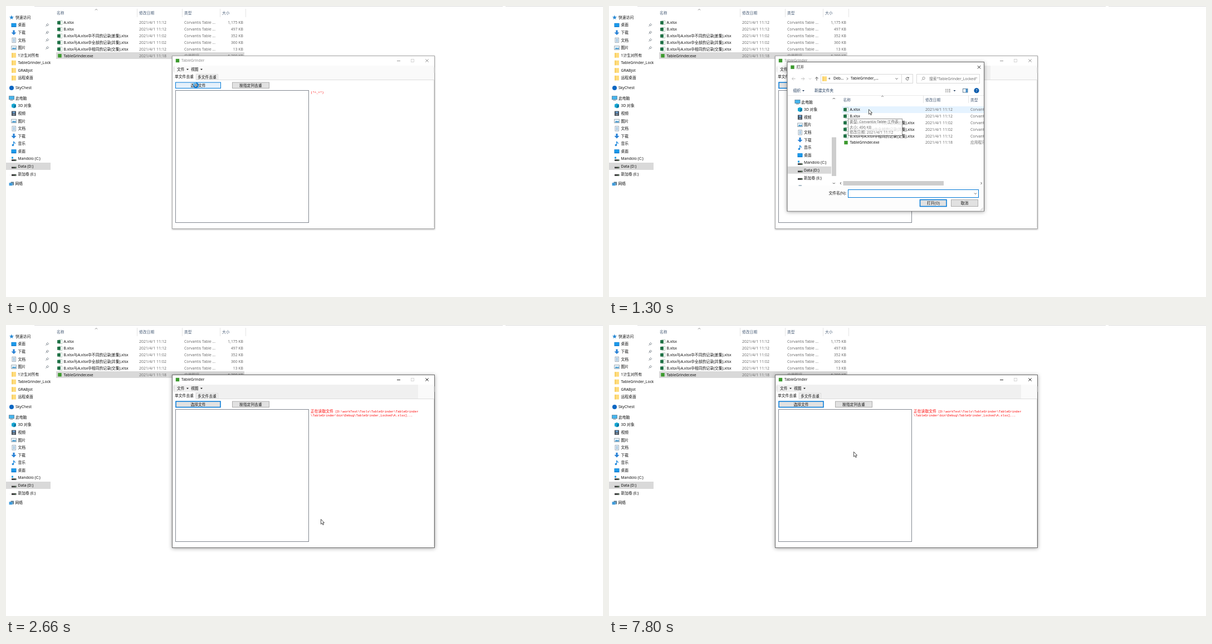
These frames come from a looping animation (1072 by 522 pixels, 8 s). An HTML page:

```html
<!DOCTYPE html>
<html lang="zh-CN">
<head>
<meta charset="utf-8">
<title>TableGrinder</title>
<style>
html, body { margin: 0; width: 100%; height: 100%; overflow: hidden; background: #fff; }
svg { display: block; width: 100vw; height: 100vh; }
text { font-family: "Noto Sans", "Noto Sans CJK SC", sans-serif; white-space: pre; }
.mono { font-family: "Liberation Mono", "Noto Sans CJK SC", monospace; }
.shadow { filter: drop-shadow(0 1px 3.5px rgba(0, 0, 0, .34)); }
.soft { filter: drop-shadow(0 1px 1.5px rgba(0, 0, 0, .3)); }
</style>
</head>
<body>
<script>
const LOOP = 8000;
const APP = 'TableGrinder', FOLDER = APP + '_Locked', SUITE = 'Corvantis Table';
const INK = '#111', GRAY = '#6d6d6d', HEAD = '#4c607a', BLUE = '#0078d7';
const PICKED = '#d9d9d9', FACE = '#f0f0f0', BUTTON = '#e1e1e1';

// Drawing helpers: each returns SVG markup.
const rect = (x, y, w, h, fill, stroke = 'none', sw = 1, extra = '') =>
  `<rect x="${x}" y="${y}" width="${w}" height="${h}" fill="${fill}" stroke="${stroke}" stroke-width="${sw}" ${extra}/>`;
const path = (d, stroke, sw = 1, fill = 'none', extra = '') =>
  `<path d="${d}" stroke="${stroke}" stroke-width="${sw}" fill="${fill}" ${extra}/>`;
const circle = (x, y, r, fill, stroke = 'none', sw = 1) =>
  `<circle cx="${x}" cy="${y}" r="${r}" fill="${fill}" stroke="${stroke}" stroke-width="${sw}"/>`;
const text = (x, y, s, { fill = INK, size = 6.8, anchor = 'start', cls = '' } = {}) =>
  `<text x="${x}" y="${y + 2.4}" fill="${fill}" font-size="${size}" text-anchor="${anchor}" class="${cls}">${s}</text>`;
const at = (x, y, s) => `<g transform="translate(${x} ${y})">${s}</g>`;
const clip = (id, x, y, w, h, s) =>
  `<clipPath id="${id}">${rect(x, y, w, h, '#000')}</clipPath><g clip-path="url(#${id})">${s}</g>`;
const down = (x, y, color = INK) => path(`M${x - 2} ${y - 1}h4l-2 2.3z`, 'none', 0, color);
const chevron = (x, y, angle, color = '#444') =>
  `<g transform="translate(${x} ${y}) rotate(${angle})">${path('M-2 -1L0 1L2 -1', color, .9)}</g>`;
const cross = (x, y, color) => path(`M${x - 2.7} ${y - 2.7}l5.4 5.4m0 -5.4l-5.4 5.4`, color, .9);

// Stepped timelines: keys are [ms, css].
let rules = '', ruleCount = 0;
function keyed(keys, content) {
  const name = 'k' + ruleCount++;
  rules += `@keyframes ${name}{${keys.map(([ms, css]) => `${ms / LOOP * 100}%{${css}}`).join('')}}` +
    `.${name}{animation:${name} ${LOOP}ms step-end infinite}`;
  return `<g class="${name}">${content}</g>`;
}
const during = (from, to, content) =>
  keyed([[0, 'opacity:0'], [from, 'opacity:1'], [to, 'opacity:0']], content);

const drive = rect(-4, .8, 8.5, 2.8, '#3a3a3a') + rect(-3.6, 0, 7.7, .8, '#c4c4c4') + rect(2, 1.8, 1.4, .9, '#6fe07a');
const icons = {
  star: path('M0 -4L1.2 -1.3L4 -1.2L1.8 .7L2.6 3.6L0 2L-2.6 3.6L-1.8 .7L-4 -1.2L-1.2 -1.3z', 'none', 0, '#2a8ad4'),
  desktop: rect(-4.5, -3.2, 9, 7, '#0a7bd0') + rect(-3.8, -2.5, 7.6, 4.6, '#1c9cec'),
  download: path('M-1.6 -4.2h3.2v4h2.9L0 4.4L-4.5 -.2h2.9z', 'none', 0, '#2b83d6'),
  document: rect(-3, -4, 6.5, 8.4, '#fff', '#8496a6', .8) + path('M-1.5 -1.8h3.6m-3.6 2h3.6m-3.6 2h3.6', '#4f8fc4', .9),
  picture: rect(-4.3, -3, 8.8, 6.6, '#e8f3fa', '#8f9ba3', .8) + path('M-3.5 2.6l2.3 -2.8l2 1.4l2 -1.4l1.2 2.8z', 'none', 0, '#2d8bc6'),
  folder: rect(-3.6, -4.2, 7.6, 8.6, '#ffdc7c') + rect(-3.6, -4.2, 1.4, 8.6, '#f4c64f'),
  cloud: circle(0, 0, 4, '#0a66c2'),
  pc: rect(-4.6, -3.8, 9.2, 6, '#45b5ee', '#5b7f96', .8) + rect(-2.6, 3, 5.2, 1.1, '#7a8c98'),
  cube: path('M0 -4.3L4 -2.6V2.5L0 4.3L-4 2.5V-2.6z', 'none', 0, '#19a7d3') + path('M0 -.8L4 -2.6V2.5L0 4.3z', 'none', 0, '#0c7ca5'),
  video: rect(-4, -4, 8, 8.4, '#3d4650') + rect(-2.3, -3, 4.7, 2.8, '#6aa2d6') + rect(-2.3, .7, 4.7, 2.8, '#7b8794'),
  music: path('M-.4 2.6V-4c.6 2 3 2 2.8 4.4', '#1e88dc', 1.2) + circle(-1.6, 2.7, 1.8, '#1e88dc'),
  system: at(0, .4, drive) + rect(-4, -3.4, 3, 3, '#1ea0e6'),
  drive,
  network: rect(-4.4, -1.8, 6, 5, '#3d9bdc') + path('M-1.5 -3.6h5.5v6.2h-2V-1.5h-3.5z', 'none', 0, '#56798f'),
  sheet: rect(-1.5, -3.7, 5.7, 7.4, '#fff', '#9db8a8', .7) + rect(-4.4, -2.9, 5.8, 5.8, '#1e7145'),
  app: rect(-3.2, -3.2, 6.4, 6.4, '#3c9a2e'),
  blank: path('M-3 -4.2h4.2l2 2V4.2h-6.2z', '#8a8a8a', .8, '#fff'),
};
const icon = (name, x, y) => at(x, y, icons[name]);

const drives = [['system', 'Mandolo (C:)'], ['drive', 'Data (D:)'], ['drive', '新加卷 (E:)']];
const places = [['cube', '3D 对象'], ['video', '视频'], ['picture', '图片'], ['document', '文档'],
  ['download', '下载'], ['music', '音乐'], ['desktop', '桌面'], ...drives];
const files = [
  ['A.xlsx', '11:12', '1,175 KB'],
  ['B.xlsx', '11:12', '497 KB'],
  ['B.xlsx与A.xlsx中不同的记录(差集).xlsx', '11:02', '352 KB'],
  ['B.xlsx与A.xlsx中全部的记录(并集).xlsx', '11:02', '360 KB'],
  ['B.xlsx与A.xlsx中相同的记录(交集).xlsx', '11:12', '13 KB'],
  [APP + '.exe', '11:18', '6,200 KB'],
];

function fileRows(iconX, nameX, dateX, typeX, top, sizeX, iconFor = i => i < 5 ? 'sheet' : 'app') {
  return files.map(([name, time, size], i) => {
    const y = top + i * 11.85;
    return icon(iconFor(i), iconX, y) + text(nameX, y, name) +
      text(dateX, y, '2021/4/1 ' + time, { fill: GRAY, size: 7 }) +
      text(typeX, y, i < 5 ? SUITE + ' ...' : '应用程序', { fill: GRAY }) +
      (sizeX ? text(sizeX, y, size, { fill: GRAY, anchor: 'end' }) : '');
  }).join('');
}
const header = (y, labels) => labels.map(([x, s]) => text(x, y, s, { fill: HEAD })).join('');
const dividers = (y, h, ...xs) => xs.map(x => rect(x, y, 1, h, '#e5e5e5')).join('');

function explorer() {
  const quick = [['desktop', '桌面'], ['download', '下载'], ['document', '文档'], ['picture', '图片'],
    ['folder', '1计生对所有'], ['folder', FOLDER], ['folder', 'GRABjot'], ['folder', '远程桌面']];
  const list = (items, top) => items.map(([name, label], i) =>
    icon(name, 14, top + i * 13.58) + text(21.5, top + i * 13.58, label)).join('');
  const pin = y => at(74, y, path('M-2.6 2.8L-.6 .6M-2 -.8L1 2M.6 -2.6L2.8 -.4L.6 1.4L-1.2 -.4z', '#7d868e', .9));
  const side = rect(0, 281, 80, 13, PICKED) +
    icon('star', 10, 20.5) + text(17, 20.5, '快速访问') + list(quick, 34) +
    icon('cloud', 10, 147) + text(17, 147, 'SkyChest') +
    icon('pc', 10, 165.5) + text(17, 165.5, '此电脑') + list(places, 179) +
    icon('network', 10, 319) + text(16.5, 319, '网络') +
    [34, 47.5, 61, 75].map(pin).join('');
  return rect(51, 0, 841, 1, '#dcdcdc') + rect(897, 0, 175, 1, '#dcdcdc') +
    clip('side', 0, 0, 80, 522, side) +
    dividers(5, 15, 235, 316, 384, 430) + chevron(162, 6.5, 180, '#777') +
    header(13, [[91, '名称'], [239, '修改日期'], [320, '类型'], [388, '大小']]) +
    rect(90, 83, 338, 12, PICKED) +
    fileRows(96.5, 103.5, 239, 320, 30, 426);
}

function appWindow() {
  const chrome = (ink, border, cls) =>
    rect(298.5, 89.5, 471, 310, '#fff', border, 1, `class="${cls}"`) +
    text(315, 98, APP, { fill: ink }) +
    path('M702 98.5h6', ink, .9) + cross(756, 98, ink) +
    rect(727.5, 95.5, 5, 5, 'none', '#ccc', .8);
  const button = (x, w, label, fill, border, sw = 1) =>
    rect(x, 137, w, 10.5, fill, border, sw) + text(x + w / 2, 142.3, label, { anchor: 'middle' });
  const log = (x, y, s) => text(x, y, s, { fill: '#f00', size: 5.67, cls: 'mono' });
  const dir = '\\' + APP;
  return during(0, 2510, chrome('#8c8c8c', '#a6a6a6', 'soft')) +
    during(2510, LOOP, chrome(INK, '#6a6a6a', 'shadow')) +
    icon('app', 308, 98) +
    rect(300, 107, 469, 25, '#fafafa') +
    during(312, 2660, rect(310, 107, 375, 25, FACE)) +
    during(2660, LOOP, rect(300, 107, 440, 25, FACE)) +
    rect(768.5, 110, 1, 10, '#d0d0d0') +
    path('M301.5 109.5v8', '#aaa', 1.2, 'none', 'stroke-dasharray="1 1.5"') +
    text(307, 113.5, '文件') + down(326, 113.8) + text(332, 113.5, '视图') + down(351, 113.8) +
    path('M381 132.5H768.5V398', '#dcdcdc') +
    rect(300, 120.5, 40, 12.5, '#fff') + rect(341.5, 122.5, 39, 10, '#f4f4f4', '#d9d9d9') +
    text(303, 127, '单文件去重') + text(344, 128, '多文件去重') +
    during(0, 900, button(304.5, 81, '选择文件', '#e5f1fb', BLUE)) +
    during(900, LOOP, button(305, 80, '选择文件', BUTTON, BLUE, 1.5)) +
    button(406.5, 66, '按指定列去重', BUTTON, '#adadad') +
    rect(304.5, 151.5, 239, 237, '#fff', '#828790') +
    during(0, 2660, log(547, 154.6, '(*^_^*)')) +
    during(2660, LOOP,
      text(547, 155, '正在读取文件', { fill: '#f00' }) +
      log(587.8, 154.6, ' [D:\\workTest\\Tools' + dir + dir) +
      log(547, 161.2, dir + '\\bin\\Debug\\' + FOLDER + '\\A.xlsx]...'));
}

function dialogList(dy, loaded) {
  const tree = places.map(([name, label], i) => {
    const y = 185 + dy + i * 13.6;
    const shown = loaded || i === 8 ? name : i > 6 ? 'blank' : null;
    return (shown ? icon(shown, 343, y) : '') + text(350, y, label);
  }).join('');
  const rest = loaded ? icon('network', 342, 325) : text(346, 324.5, '网络');
  return rect(321, 287 + dy, 78, 13, PICKED) + icon('pc', 338.5, 171.5 + dy) + text(345.5, 171.5 + dy, '此电脑') +
    tree + rest + header(168 + dy / 2, [[420.5, '名称'], [568, '修改日期'], [649, '类型']]) +
    fileRows(425.5, 432.5, 568, 649, 185 + dy, 0,
      i => loaded ? (i < 5 ? 'sheet' : 'app') : i % 5 ? 'sheet' : 'blank');
}

function dialogControls() {
  const field = (x, w) => rect(x, 122.5, w, 16, '#fff', '#d9d9d9');
  const button = (x, w, label, fill, border, sw = 1) =>
    rect(x, 347.5, w, 12, fill, border, sw) + text(x + w / 2, 353.5, label, { anchor: 'middle' });
  const nameBox = border => rect(429.5, 329.5, 234, 14, '#fff', border);
  const arrow = (x, angle, color) =>
    `<g transform="translate(${x} 130.5) rotate(${angle})">${path('M3.2 0H-3M-.2 -2.8L-3 0L-.2 2.8', color, .9)}</g>`;
  return arrow(331.5, 0, '#bbb') + arrow(348, 180, '#bbb') + chevron(361, 130.5, 0, '#bbb') + arrow(373, 90, '#444') +
    field(380.5, 165) + rect(525, 122.5, 1, 16, '#d9d9d9') + icon('folder', 387, 130.5) +
    text(394, 130, '«') + text(403, 130, 'Deb...') + chevron(428, 130.5, -90) + text(434, 130, APP + '_...') +
    chevron(516.5, 130.5, 0) + path('M537.8 128.9a2.5 2.5 0 1 0 .4 2.3M538.2 127.4v2h-2', '#444', .9) +
    field(552.5, 113) + circle(565, 129.5, 2.2, 'none', '#888', .8) + path('M563.4 131.2l-2.2 2.3', '#888', .8) +
    text(575, 130.3, `搜索"${FOLDER}"`, { fill: GRAY }) +
    text(330.5, 152, '组织', { fill: '#1e395b' }) + down(349, 152, '#1e395b') + text(369, 152, '新建文件夹', { fill: '#1e395b' }) +
    path('M604 149.5h2m1 0h2m1 0h3m-9 2.3h2m1 0h2m1 0h3m-9 2.3h2m1 0h2m1 0h3', '#777', .9) + down(620.5, 152, '#1e395b') +
    text(426, 336, '文件名(N):', { anchor: 'end' }) +
    during(900, 2000, nameBox(BLUE)) + during(2000, LOOP, nameBox('#7a7a7a')) +
    chevron(658, 336.5, 0) +
    during(1420, 1580, rect(431, 331.5, 19.5, 10, BLUE) + text(431.5, 336.3, 'A.xlsx', { fill: '#fff' })) +
    during(1580, LOOP, text(431.5, 336.3, 'A.xlsx')) +
    during(900, 2250, button(558.5, 47.5, '打开(O)', BUTTON, BLUE, 1.5)) +
    during(2250, 2390, button(557.5, 49, '打开(O)', '#e5f1fb', BLUE)) +
    during(2390, LOOP, button(557.5, 49, '打开(O)', '#cce4f7', '#005499')) +
    button(614.5, 48, '取消', BUTTON, '#adadad') +
    path('M667 366.5l4.5 -4.5m-2 4.5l2 -2', '#aaa', .9);
}

function dialog() {
  const row = (i, fill) => rect(418.5, 180 + i * 11.85, 254.5, 12, fill);
  const scroll = rect(400, 235.5, 8, 69.5, '#cdcdcd') + rect(420.5, 314, 180.5, 8, '#cdcdcd') +
    chevron(403.8, 166, 180) + chevron(403.8, 318, 0) + chevron(416, 318, 90) + chevron(668.5, 318, -90);
  const listFrame = rect(321, 160, 352, 1, '#e9e9e9') + dividers(161, 13, 564, 645) + chevron(491, 162, 180, '#777') +
    scroll;
  const tools = rect(635.5, 148.5, 8.5, 6.5, '#fff', '#55758f', .9) + rect(640.5, 148.5, 3.5, 6.5, '#4a90c8') +
    circle(660, 151.7, 4.6, '#0b5cad') + text(660, 151.7, '?', { fill: '#fff', anchor: 'middle', size: 7 });
  const footer = fill => rect(321, 322.5, 352, 45, fill);
  const placeholders = [[393.5, 331, 33, 10], [429, 329, 234.5, 14.5], [557, 346.5, 50, 14.5], [613.5, 346.5, 50, 14.5], [663.5, 358, 9.5, 9]]
    .map(r => rect(...r, '#fff')).join('');
  const tip = (y, s) => text(432, y, s, { fill: '#575757' });
  const tooltip = rect(429.5, 202.5, 97, 30, '#fff', '#767676') +
    tip(208, `类型: ${SUITE} 工作表`) + tip(217.3, '大小: 496 KB') + tip(226.6, '修改日期: 2021/4/1 11:12');
  const highlight = during(1030, 1300, row(1, '#e5f3ff')) + during(1300, 1420, row(0, '#e5f3ff')) +
    during(1420, 1580, row(0, '#cce8ff')) + during(1580, LOOP, row(0, PICKED)) + during(1730, 1850, row(4, '#e5f3ff'));
  const early = clip('early', 321, 161, 352, 161.5, dialogList(0, false));
  const late = highlight + clip('late', 321, 161, 352, 161.5, dialogList(.8, true)) + dialogControls();
  const body = rect(320, 100.5, 353.5, 267.5, '#fff', '#666', 1, 'class="shadow"') +
    icon('app', 329.5, 109.7) + text(336.5, 109.7, '打开') + cross(664.5, 109.7, INK) +
    during(500, 900, footer(FACE) + placeholders) +
    during(900, LOOP, footer('#fdfdfd')) +
    during(625, LOOP, listFrame + tools) +
    during(625, 900, early) + during(900, LOOP, late) +
    keyed([[0, 'opacity:0'], [1160, 'opacity:1'], [1300, 'opacity:.8'], [1420, 'opacity:0']], tooltip);
  return keyed([[0, 'opacity:0'], [312, 'opacity:.8'], [500, 'opacity:1'], [2510, 'opacity:.2'], [2660, 'opacity:0']], body);
}

function pointer() {
  const stops = [[0, 341, 142], [500, 355, 151], [625, 374, 163], [750, 392, 175], [900, 418, 188], [1030, 440, 196],
    [1160, 456, 196], [1300, 466, 185], [1730, 482, 232], [1850, 508, 297], [2000, 540, 325], [2125, 558, 342],
    [2250, 565, 348], [3070, 543, 312], [3220, 505, 280], [3350, 477, 257], [3500, 458, 240], [3640, 446, 231],
    [3770, 440, 227], [7800, 439, 227]];
  const arrow = path('M.5 .5V9.2L2.5 7.4L4 10.6L5.4 10L4 6.8H6.6z', '#222', .8, '#fff');
  const ring = (x, y, r, sw) => circle(x, y, r, 'none', '#1583d8', sw) + path(`M${x - r} ${y}a${r} ${r} 0 0 1 ${r} ${-r}`, '#6cc0f5', sw);
  const click = circle(.8, 1.6, 5.6, 'none', '#333', .8);
  return keyed(stops.map(([ms, x, y]) => [ms, `transform:translate(${x}px,${y}px)`]),
    during(0, 500, ring(0, 0, 4.1, 2.4)) + during(500, LOOP, arrow) +
    during(1420, 1580, click) + during(2390, 2510, click) +
    during(5330, 5580, ring(8.5, .5, 3.4, 1.8)));
}

const scene = explorer() + appWindow() + dialog() + pointer();
document.body.innerHTML = `<style>${rules}</style><svg viewBox="0 0 1072 522">${scene}</svg>`;
</script>
</body>
</html>
```
